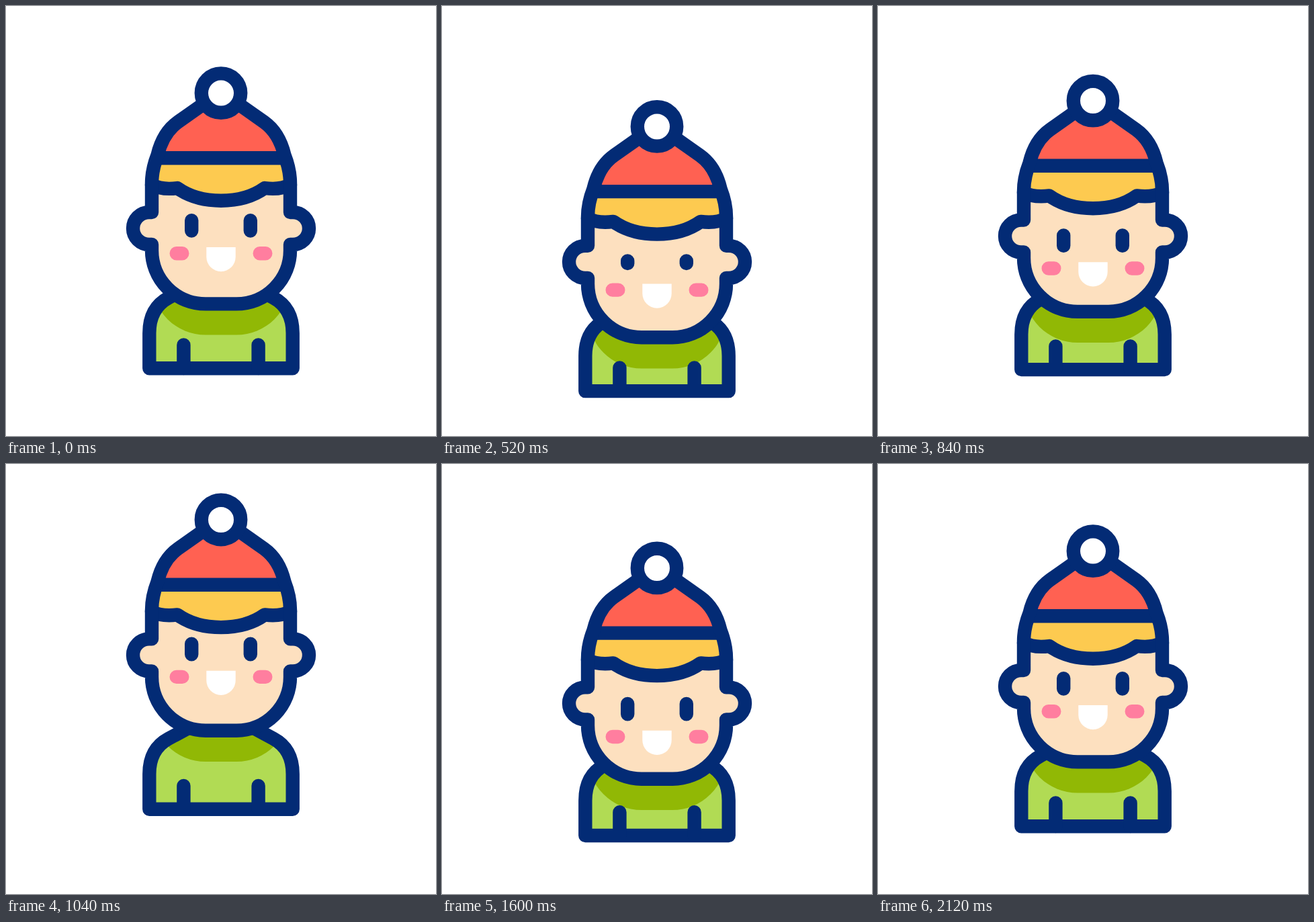
An HTML page for the animation above (2.4 s loop, 640 by 640 pixels).

```html
<!DOCTYPE html>
<html lang="en">
<head>
<meta charset="utf-8">
<title>Bouncing boy in a bobble hat</title>
<style>
  html, body { margin: 0; width: 100%; height: 100%; overflow: hidden; background: #fff; }
  svg { display: block; width: 100%; height: 100%; }
  .line { fill: none; stroke: #032b75; stroke-width: 20.4; stroke-linecap: round; stroke-linejoin: round; }
</style>
</head>
<body>
<svg viewBox="0 0 640 640">
  <defs>
    <path id="torso" d="M213.3 539.3V487C213.3 463 222 445 242 434.3L300 403H340L398 434.3C418 445 426.7 463 426.7 487V539.3Z"/>
    <path id="skull" d="M320 127.5L256 172.6C240 184 230 203 225.5 222C220 236 217 250 217 264V307H213A24 24 0 0 0 213 355H217V363A80 80 0 0 0 297 443.4H343A80 80 0 0 0 423 363V355H427A24 24 0 0 0 427 307H423V264C423 250 420 236 414.5 222C410 203 400 184 384 172.6Z"/>
    <clipPath id="inTorso"><use href="#torso"/></clipPath>
    <clipPath id="inSkull"><use href="#skull"/></clipPath>
  </defs>

  <g id="body">
    <use href="#torso" fill="#b1db54"/>
    <g clip-path="url(#inTorso)">
      <rect id="shadow" x="217" y="290" width="206" height="199.6" rx="80" fill="#91b805"/>
    </g>
    <use href="#torso" class="line"/>
    <path class="line" d="M264.4 504.5V539M375.6 504.5V539"/>
  </g>

  <g id="head">
    <use href="#skull" fill="#fde0bf"/>
    <g clip-path="url(#inSkull)">
      <path fill="#fdca50" d="M210 226H430V266C412 272 400 273 385 271C350 296 290 296 255 271C240 273 228 272 210 266Z"/>
      <path fill="#ff6152" d="M210 120H430V226H210Z"/>
    </g>
    <path class="line" d="M217 266C228 272 240 273 255 271C290 296 350 296 385 271C400 273 412 272 423 266M225.5 226.3H414.5"/>
    <use href="#skull" class="line"/>
    <circle class="line" cx="320" cy="129.6" r="29.2" style="fill:#fff"/>
    <g id="face">
      <path id="eyes" class="line"/>
      <path fill="#ff7e9f" d="M253.7 358H262.3a10.2 10.2 0 0 1 0 20.4H253.7a10.2 10.2 0 0 1 0-20.4ZM377.7 358H386.3a10.2 10.2 0 0 1 0 20.4H377.7a10.2 10.2 0 0 1 0-20.4Z"/>
      <path fill="#fff" d="M298.3 359H341.7V373.5a21.7 21.7 0 0 1-43.4 0Z"/>
    </g>
  </g>
</svg>
<script>
const LOOP = 2400, STEP = 40;
const el = id => document.getElementById(id);
const moveY = (id, y) => el(id).setAttribute('transform', `translate(0 ${y})`);

// Eased interpolation between [time, value] keys
function track(t, keys) {
  if (t <= keys[0][0]) return keys[0][1];
  for (let i = 1; i < keys.length; i++) {
    const [t0, a] = keys[i - 1], [t1, b] = keys[i];
    if (t < t1) {
      const s = (t - t0) / (t1 - t0);
      return a + (b - a) * s * s * (3 - 2 * s);
    }
  }
  return keys[keys.length - 1][1];
}

// Down, up, down, rest; each nested part follows its parent with a delay
const bounce = (t, delay, down, up, down2) => track(t - delay,
  [[200, 0], [600, down], [1040, up], [1480, down2], [1920, 0]]);

function draw(now) {
  const t = Math.floor(now % LOOP / STEP) * STEP;
  const body = bounce(t, 0, 37.8, -25.5, 16.7);
  const head = bounce(t, 80, 24.7, -25.5, 12);
  const face = bounce(t, 160, 13, -12.3, 13);
  const eye = track(t, [[400, 15.4], [560, 1.6], [720, 15.4]]);

  moveY('body', body);
  moveY('shadow', head);
  moveY('head', body + head);
  moveY('face', face);
  const top = 326.8 - eye / 2;
  el('eyes').setAttribute('d', `M276.2 ${top}v${eye}M363.8 ${top}v${eye}`);
  requestAnimationFrame(draw);
}
draw(performance.now());
</script>
</body>
</html>
```
